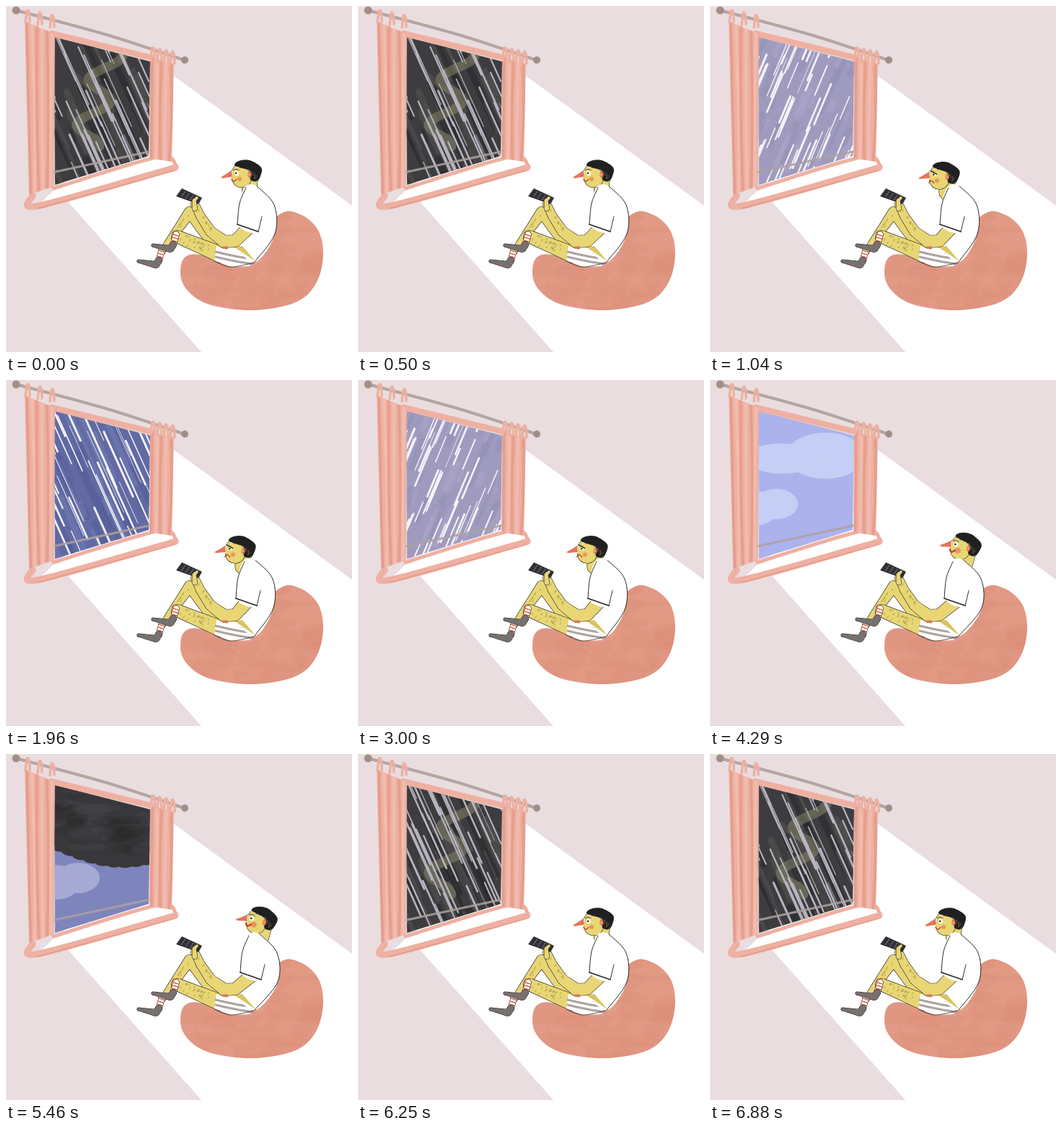
An HTML page with a canvas that plays this animation: 480x480 px, repeating every 7010 ms.

```html
<!DOCTYPE html>
<html lang="en">
<head>
<meta charset="utf-8">
<title>Window weather</title>
<style>
html, body { margin: 0; width: 100%; height: 100%; overflow: hidden; background: #e9dde0; }
canvas { display: block; width: 480px; height: 480px; }
</style>
</head>
<body>
<canvas id="stage" width="480" height="480"></canvas>
<script>
const ctx = document.getElementById('stage').getContext('2d');
const LOOP = 7010, STEP = 125;
const INK = '#2a2a2c', SKIN = '#e8d674', PINK = '#eeb0a1', ROSE = '#e08e7b', RED = '#dc6249', GREY = '#aca2a0';

// Last: number of the drawing that is held until the next scene
const SCENES = [
  { at: 790, last: 6, sky: 'shower', mood: 'cross' },
  { at: 1830, last: 5, sky: 'downpour', mood: 'cross' },
  { at: 2750, last: 8, sky: 'shower', mood: 'cross' },
  { at: 3920, last: 7, sky: 'sunny', mood: 'happy' },
  { at: 4960, last: 7, sky: 'cloudy', mood: 'happy' },
  { at: 6000, last: 11, sky: 'storm', mood: 'calm' }
];

const RAIN = {
  storm: { base: '#3d3d3f', wash: ['#27282a', '#535451'], drop: '#b9b4c1', slope: .45, count: 85, long: 120 },
  downpour: { base: '#626aa4', wash: ['#525b95', '#747cb0'], drop: '#f3f2f8', slope: .45, count: 75, long: 120 },
  shower: { base: '#9f9bbf', wash: ['#9490b5', '#aba7c8'], drop: '#f5f3f8', slope: -.42, count: 110, long: 60 }
};

// Head offset, head tilt and shoulder offset
const POSES = {
  calm: { x: 0, y: 0, tilt: 0, lean: 0 },
  cross: { x: -8, y: 2, tilt: .05, lean: -2 },
  happy: { x: 24, y: -4, tilt: .2, lean: 4 }
};

function random(seed) {
  return () => (seed = (seed * 16807) % 2147483647) / 2147483647;
}

const lerp = (a, b, u) => a + (b - a) * u;
const between = (p, q, u) => [lerp(p[0], q[0], u), lerp(p[1], q[1], u)];

// Catmull-Rom curve through the points
function curve(pts, closed) {
  const n = pts.length;
  const at = i => pts[closed ? (i + n) % n : Math.max(0, Math.min(n - 1, i))];
  ctx.beginPath();
  ctx.moveTo(...pts[0]);
  for (let i = 0; i < (closed ? n : n - 1); i++) {
    const [a, b, c, d] = [at(i - 1), at(i), at(i + 1), at(i + 2)];
    ctx.bezierCurveTo(b[0] + (c[0] - a[0]) / 6, b[1] + (c[1] - a[1]) / 6,
      c[0] - (d[0] - b[0]) / 6, c[1] - (d[1] - b[1]) / 6, ...c);
  }
}

function poly(pts) {
  ctx.beginPath();
  for (const p of pts) ctx.lineTo(...p);
  ctx.closePath();
}

function fill(color) {
  ctx.fillStyle = color;
  ctx.fill();
}

function line(color, width, ...pts) {
  curve(pts);
  ctx.strokeStyle = color;
  ctx.lineWidth = width;
  ctx.stroke();
}

function flat(color, ...pts) { poly(pts); fill(color); }
function blob(color, ...pts) { curve(pts, true); fill(color); }

function dot(color, x, y, rx, ry = rx) {
  ctx.beginPath();
  ctx.ellipse(x, y, rx, ry, 0, 0, 7);
  fill(color);
}

function faded(alpha, draw) {
  ctx.save();
  ctx.globalAlpha *= alpha;
  draw();
  ctx.restore();
}

// Clips to the current path while drawing
function inside(draw) {
  ctx.save();
  ctx.clip();
  draw();
  ctx.restore();
}

// Tapered limb through joints [x, y, radius], with a thin outline
function limb(color, ...joints) {
  for (const [tone, grow] of [[INK, .6], [color, 0]]) {
    joints.forEach(([x, y, r], i) => {
      dot(tone, x, y, r + grow);
      if (!i) return;
      const [px, py, pr] = joints[i - 1];
      const a = Math.atan2(y - py, x - px), s = Math.sin(a), c = Math.cos(a);
      const R = pr + grow, Q = r + grow;
      flat(tone, [px - s * R, py + c * R], [x - s * Q, y + c * Q], [x + s * Q, y - c * Q], [px + s * R, py - c * R]);
    });
  }
}

function mix(a, b, u) {
  return 'rgb(' + a.map((v, i) => Math.round(lerp(v, b[i], u))) + ')';
}

function room() {
  ctx.fillStyle = '#e9dde0';
  ctx.fillRect(0, 0, 480, 480);
  flat('#fff', [73, 257], [200, 73], [480, 277], [480, 480], [271, 480]);
  flat('#fff', [66, 256], [209, 211], [236, 221], [48, 273]);
}

function rain(r, k) {
  const rnd = random(r.count * 7), span = 300;
  for (let i = 0; i < 90; i++) {
    const x = -30 + rnd() * 290, y = 10 + rnd() * 220, h = r.long * rnd();
    faded(.55, () => line(r.wash[i % 2], 3 + rnd() * 8, [x, y], [x + h * r.slope, y + h]));
  }
  if (r === RAIN.storm) bolt();
  for (let i = 0; i < r.count; i++) {
    const h = r.long * (.35 + .65 * rnd()), w = .8 + rnd() * 2.2;
    const lane = lerp(20, 250, (i + rnd()) / r.count);
    const y = (rnd() * span + (k % 4) * span / 4) % span - 60;
    const x = lane + (y + h / 2 - 130) * r.slope;
    line(r.drop, w, [x, y], [x + h * r.slope, y + h]);
  }
}

function bolt() {
  const pts = Array.from({ length: 17 }, (_, i) => {
    const u = i / 16;
    return [142 - 32 * u + 20 * Math.cos(u * Math.PI * 4), 70 + 125 * u];
  });
  faded(.5, () => line('#8d8b6c', 13, ...pts));
}

function clouds(k, dark) {
  const gloom = dark ? Math.min(1, (k + 1) / 4) : 0;
  const drift = (k + (dark ? 8 : 0) - 3) * .9;
  const pale = mix([197, 206, 244], [166, 169, 211], gloom);
  ctx.fillStyle = mix([172, 178, 236], [126, 133, 188], gloom);
  ctx.fillRect(60, 35, 150, 220);
  dot(pale, 160 + drift, 105, 54, 32);
  dot(pale, 100 + drift, 109, 50, 21);
  dot(pale, 92 + drift, 172, 30, 21);
  dot(pale, 62 + drift, 178, 32, 24);
  if (dark) stormCloud(-22 * Math.max(0, 4 - k));
}

function stormCloud(dy) {
  const rnd = random(5);
  const edge = x => 132 + 26 * Math.sin((x - 67) / 190 * Math.PI) + dy;
  for (let x = 45; x < 225; x += 15) {
    ctx.fillStyle = '#38383b';
    ctx.fillRect(x - 8, -60, 17, edge(x) + 50);
    dot('#38383b', x, edge(x) - 13, 16, 13);
  }
  for (let i = 0; i < 40; i++) {
    const x = 60 + rnd() * 150, y = edge(x) - 18 - rnd() * 85;
    faded(.15, () => dot(i % 2 ? '#1d1e20' : '#5b5b5d', x, y, 10 + rnd() * 18, 4 + rnd() * 6));
  }
}

function view(sky, k) {
  poly([[67, 43], [200, 77], [198, 208], [68, 248]]);
  inside(() => {
    const r = RAIN[sky];
    if (!r) return clouds(k, sky === 'cloudy');
    ctx.fillStyle = r.base;
    ctx.fillRect(60, 35, 150, 220);
    rain(r, k);
  });
  faded(.85, () => line(GREY, 3, [64, 231], [208, 200]));
}

// Cloth between four corners, with soft upright folds
function curtain(tl, tr, bl, br, folds) {
  poly([tl, tr, br, bl]);
  fill(PINK);
  inside(() => {
    for (let i = 0; i < folds; i++) {
      const u = (i + .4) / folds, top = between(tl, tr, u), low = between(bl, br, u);
      const [x, y] = between(top, low, .55);
      faded(.5, () => line(i % 2 ? '#f5c9bd' : ROSE, 4, top, [x + 2 * Math.sin(i * 2), y], low));
    }
  });
}

function tabs(x, y, count, gap) {
  for (let i = 0; i < count; i++) {
    const cx = x + i * gap, cy = y + i * gap * .2;
    line(PINK, 3.5, [cx - 3, cy + 17], [cx - 1, cy + 1], [cx + 2, cy + 3], [cx + 3, cy + 16]);
  }
}

function frame() {
  line(PINK, 8, [63, 38], [203, 72]);
  line(PINK, 5, [64, 42], [64, 250]);
  line(PINK, 5, [66, 253], [209, 210], [236, 221]);
  line(PINK, 9, [37, 263], [46, 277], [235, 224]);
  faded(.6, () => line(ROSE, 1.5, [44, 281], [235, 228]));
  curtain([26, 21], [68, 39], [32, 262], [66, 250], 6);
  curtain([200, 71], [233, 80], [199, 211], [230, 216], 5);
  line('#b3a5a0', 4, [14, 6], [140, 40], [247, 75]);
  dot('#a28e88', 14, 6, 5.5);
  dot('#a28e88', 248, 75, 5);
  tabs(30, 6, 3, 17);
  tabs(204, 58, 4, 9);
}

function beanbag() {
  blob('#df9781', [242, 370], [255, 345], [320, 347], [378, 290], [408, 289], [433, 311], [440, 346],
    [430, 385], [402, 411], [345, 422], [285, 415], [253, 396]);
  inside(() => {
    const rnd = random(91);
    for (let i = 0; i < 40; i++) {
      const x = 240 + rnd() * 200, y = 290 + rnd() * 130;
      faded(.08, () => dot(i % 2 ? '#c96e57' : '#f6c2b2', x, y, 15 + rnd() * 22, 6 + rnd() * 14));
    }
  });
}

function foot(x, y) {
  limb('#fff', [x + 4, y - 11, 4], [x + 1, y, 4]);
  for (let i = 0; i < 3; i++) line(RED, 1.6, [x - i, y - 11 + i * 4], [x + 7 - i, y - 9 + i * 4]);
  limb('#77716f', [x - 28, y + 4, 2], [x - 4, y + 9, 4.5], [x, y + 3, 4.5]);
}

function hairs(from, to, spread, count) {
  const rnd = random(count);
  for (let i = 0; i < count; i++) {
    const [x, y] = between(from, to, rnd()), d = (rnd() - .5) * spread;
    line('#85783f', .7, [x, y + d], [x - 1, y + d + 2]);
  }
}

function legs() {
  limb(SKIN, [298, 342, 9], [255, 286, 7.5], [217, 340, 4]);
  hairs([253, 288], [226, 328], 6, 14);
  foot(212, 350);
  limb(SKIN, [298, 345, 11], [238, 320, 8.5]);
  hairs([240, 320], [285, 338], 14, 28);
  faded(.6, () => dot(RED, 235, 314, 5, 3));
  foot(232, 328);
}

function torso(lean) {
  flat('#fff', [292, 333], [345, 350], [338, 361], [312, 362], [289, 353]);
  for (const y of [341, 348]) line(GREY, 3, [291, y], [318, y + 6], [342, y + 10]);
  line(INK, .8, [289, 354], [312, 362], [344, 356]);
  blob('#fff', [331 + lean, 252], [350 + lean, 251], [374 + lean, 281], [371 + lean, 322], [346, 355], [322, 334], [322 + lean, 288]);
  line(INK, 1, [348 + lean, 250], [372 + lean, 276], [373 + lean, 316], [345, 355]);
  flat('#d8c560', [316, 334], [328, 333], [346, 354]);
}

function arm(lean) {
  limb(SKIN, [337 + lean, 307, 9], [318, 326, 8], [303, 327, 8.5], [284, 313, 7], [270, 292, 6], [262, 275, 5.5]);
  faded(.6, () => dot(RED, 304, 335, 5, 2));
  hairs([268, 284], [288, 314], 5, 10);
  blob('#fff', [333 + lean, 254], [352 + lean, 270], [352 + lean, 313], [322 + lean, 303]);
  line(INK, 1, [333 + lean, 252], [324 + lean, 274], [321 + lean, 303]);
  line(INK, 1.8, [321 + lean, 303], [350 + lean, 313]);
  line(INK, 1, [350 + lean, 313], [355 + lean, 292]);
}

function remote() {
  const [tl, tr, bl, br] = [[244, 253], [272, 266], [236, 264], [267, 275]];
  flat('#303135', tl, tr, br, bl);
  for (let i = 0; i < 12; i++) {
    const u = .2 + i % 4 * .2, v = .25 + (i >> 2) * .25;
    dot('#85868b', ...between(between(tl, tr, u), between(bl, br, u), v), 1.1, .8);
  }
  limb(SKIN, [262, 281, 3.5], [261, 270, 2.5], [265, 266, 1.8]);
}

function head(pose, mood) {
  ctx.save();
  ctx.translate(318 + pose.x, 219 + pose.y);
  ctx.rotate(pose.tilt);
  limb(SKIN, [20, 21, 11], [20, 37, 10]);
  limb(SKIN, [9, 19, 13.5], [7, 22, 10]);
  flat(SKIN, [-4, 8], [0, 2], [8, 8], [0, 22], [-5, 20]);
  line(INK, .7, [-1, 3], [-6, 10], [-19, 19]);
  flat('#e8735a', [-5, 10], [-19, 18], [-18, 20], [-5, 18]);
  blob('#1f2022', [-1, 2], [5, -4], [20, -5], [36, 5], [35, 17], [30, 24], [21, 22], [21, 10], [10, 6]);
  hairs([24, 14], [32, 20], 7, 9);
  dot(RED, 20, 15, 2.6, 4);
  dot('#eca47a', 19.5, 15, 1.5, 2.6);
  faded(.7, () => dot('#e67a5a', 6, 21, mood === 'happy' ? 4 : 3));
  face(mood);
  ctx.restore();
}

function face(mood) {
  const cross = mood === 'cross';
  dot('#fff', 2, 13, 3, cross ? 1.8 : 3.4);
  dot(INK, 1, 13, 1.3);
  line(INK, cross ? 1.6 : .9, [-3, cross ? 8 : 9], [1, cross ? 10 : 7.5], [5, cross ? 12 : 9]);
  const bend = cross ? -1.5 : 1.5;
  line('#c94437', mood === 'happy' ? 2.6 : 1.5, [-5, 23 - bend], [-2, 23 + bend], [2, 23 - bend]);
}

function paint(time) {
  let t = time % LOOP;
  if (t < SCENES[0].at) t += LOOP - STEP;
  const scene = SCENES.filter(s => s.at <= t).pop();
  const k = Math.min(scene.last, Math.floor((t - scene.at + 10) / STEP));
  const pose = POSES[scene.mood];
  ctx.lineCap = ctx.lineJoin = 'round';
  room();
  view(scene.sky, k);
  frame();
  beanbag();
  legs();
  head(pose, scene.mood);
  torso(pose.lean);
  arm(pose.lean);
  remote();
}

const begin = performance.now();
function tick() {
  paint(performance.now() - begin);
  requestAnimationFrame(tick);
}
tick();
</script>
</body>
</html>
```
